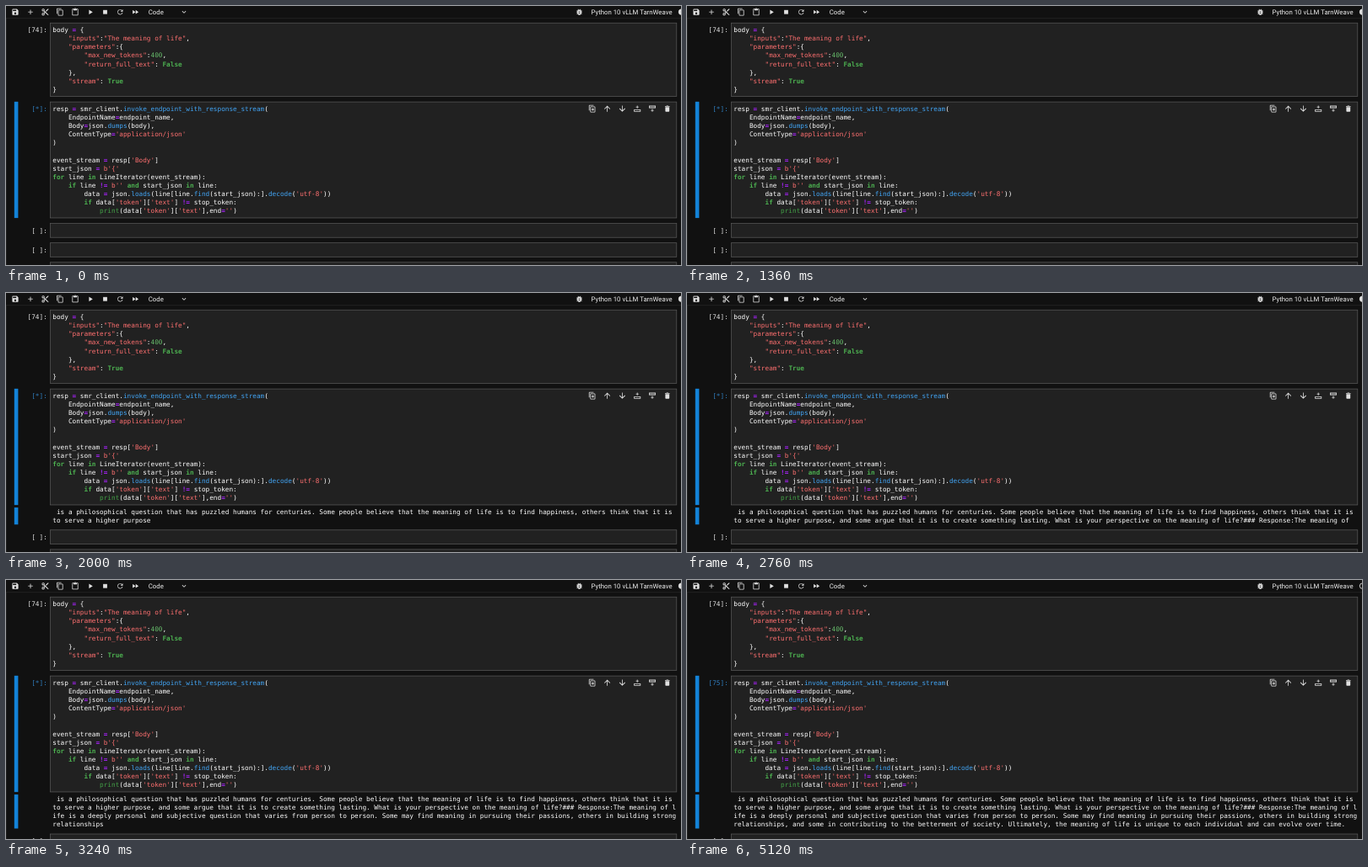
Recreate the animation shown at these times as an HTML page. Size 800x308 px, loop 5.51 s.

```html
<!DOCTYPE html>
<html lang="en">
<head>
<meta charset="utf-8">
<title>Notebook streaming response</title>
<style>
  html, body { margin: 0; width: 100%; height: 100%; overflow: hidden; background: #111; }
  svg { display: block; width: 800px; height: 308px; }
  text { white-space: pre; text-rendering: geometricPrecision; fill: #fff; }
  .mono { font: 7.727px "DejaVu Sans Mono", monospace; }
  .ui { font: 7.8px Roboto, sans-serif; fill: #eee; }
  .prompt { text-anchor: end; fill: #e0e0e0; }
  .active { fill: #307fc1; }
  .bar { fill: #1383d8; }
  .box { fill: #212121; stroke: #5c5c5c; stroke-width: .7; }
  .icon { fill: #e0e0e0; fill-rule: evenodd; }
  .str { fill: #ff7070; }
  .key { fill: #4caf50; font-weight: bold; }
  .num { fill: #66bb6a; }
  .fn { fill: #43a047; }
  .op { fill: #aa22ff; font-weight: bold; }
  .prop { fill: #42a5f5; }
</style>
</head>
<body>
<svg id="stage" viewBox="0 0 800 308">
  <rect width="800" height="308" fill="#111"/>
  <path d="M0 14.6H800M.4 14.6V308" stroke="#292929" stroke-width=".7"/>
</svg>
<script>
const LOOP = 5510, LINE = 10.105, TEXT_X = 55.3, BASE = 7.72;
const stage = document.getElementById('stage');

function add(tag, attrs, parent = stage, text) {
  const el = document.createElementNS('http://www.w3.org/2000/svg', tag);
  for (const k in attrs) el.setAttribute(k, attrs[k]);
  if (text !== undefined) el.textContent = text;
  return parent.appendChild(el);
}

// Icons on a 24 unit grid
const ICONS = {
  save: 'M17 3H5a2 2 0 0 0-2 2v14a2 2 0 0 0 2 2h14a2 2 0 0 0 2-2V7zM12 19a3 3 0 1 1 0-6 3 3 0 0 1 0 6zM15 9H5V5h10z',
  plus: 'M19 13h-6v6h-2v-6H5v-2h6V5h2v6h6z',
  cut: 'M9.6 7.6A4 4 0 1 0 7.6 9.6L10 12l-2.4 2.4a4 4 0 1 0 2 2L12 14l7 7h3v-1zM6 8a2 2 0 1 1 0-4 2 2 0 0 1 0 4zM6 20a2 2 0 1 1 0-4 2 2 0 0 1 0 4zM19 3l-6 6 2 2 7-7V3z',
  copy: 'M16 1H4a2 2 0 0 0-2 2v14h2V3h12zM19 5H8a2 2 0 0 0-2 2v14a2 2 0 0 0 2 2h11a2 2 0 0 0 2-2V7a2 2 0 0 0-2-2zM19 21H8V7h11z',
  paste: 'M19 2h-4.2a3 3 0 0 0-5.6 0H5a2 2 0 0 0-2 2v16a2 2 0 0 0 2 2h14a2 2 0 0 0 2-2V4a2 2 0 0 0-2-2zM12 2a1 1 0 1 1 0 2 1 1 0 0 1 0-2zM19 20H5V4h2v3h10V4h2z',
  play: 'M8 5v14l11-7z',
  stop: 'M6 6h12v12H6z',
  restart: 'M17.65 6.35A8 8 0 1 0 19.73 14h-2.08A6 6 0 1 1 16.22 7.78L13 11h7V4z',
  forward: 'M4 18l8.5-6L4 6zM13 6v12l8.5-6z',
  chevron: 'M7.4 8.6L12 13.2l4.6-4.6L18 10l-6 6-6-6z',
  bug: 'M20 8h-2.8a6 6 0 0 0-1.8-2L17 4.4 15.6 3l-2.2 2.2a6 6 0 0 0-2.8 0L8.4 3 7 4.4 8.6 6a6 6 0 0 0-1.8 2H4v2h2v2H4v2h2v2H4v2h2.8a6 6 0 0 0 10.4 0H20v-2h-2v-2h2v-2h-2v-2h2zM14 16h-4v-2h4zM14 12h-4v-2h4z',
  up: 'M12 3l-9 9 1.6 1.6L11 7.2V21h2V7.2l6.4 6.4L21 12z',
  down: 'M12 21l9-9-1.6-1.6L13 16.8V3h-2v13.8l-6.4-6.4L3 12z',
  above: 'M2 14h20v7H2zM4 16v3h16v-3zM11 3h2v3h3v2h-3v3h-2V8H8V6h3z',
  below: 'M2 3h20v7H2zM4 5v3h16V5zM11 13h2v3h3v2h-3v3h-2v-3H8v-2h3z',
  trash: 'M6 19a2 2 0 0 0 2 2h8a2 2 0 0 0 2-2V7H6zM19 4h-3.5l-1-1h-5l-1 1H5v2h14z'
};
ICONS.duplicate = ICONS.copy + 'M12.5 10h2v3h3v2h-3v3h-2v-3h-3v-2h3z';

const icon = (name, x, y) => add('path', {
  class: 'icon', d: ICONS[name], transform: `translate(${x} ${y}) scale(.4) translate(-12 -12)`
});

const TOKENS = /(b?'[^']*'|"[^"]*")|\b(for|in|if|and|True|False)\b|\b(\d+)\b|\b(print)\b|(!=|=)|(?<=\.)(\w+)/g;
const KINDS = ['str', 'key', 'num', 'fn', 'op', 'prop'];

function codeLine(src, y) {
  const el = add('text', { class: 'mono', x: TEXT_X, y });
  let pos = 0;
  for (const m of src.matchAll(TOKENS)) {
    el.append(src.slice(pos, m.index));
    const kind = KINDS[m.slice(1).findIndex(g => g !== undefined)];
    add('tspan', { class: kind }, el, m[0]);
    pos = m.index + m[0].length;
  }
  el.append(src.slice(pos));
}

function cell(y, label, lines, parent = stage) {
  add('rect', { class: 'box', x: 52.6, y: y + .3, width: 742.2, height: lines * LINE + 6.5 }, parent);
  return add('text', { class: 'mono prompt', x: 48.8, y: y + 3.55 + BASE }, parent, label);
}

function codeCell(y, label, src) {
  const lines = src.split('\n');
  const prompt = cell(y, label, lines.length);
  lines.forEach((s, i) => codeLine(s, y + 3.55 + BASE + i * LINE));
  return prompt;
}

// Toolbar
[['save', 11], ['plus', 29], ['cut', 46.5], ['copy', 64], ['paste', 82], ['play', 100],
 ['stop', 117.5], ['restart', 135.3], ['forward', 153.3], ['chevron', 211], ['bug', 679.5]]
  .forEach(([name, x]) => icon(name, x, 7.2));
add('text', { class: 'ui', x: 168.8, y: 9.9, 'font-weight': 500 }, stage, 'Code');
add('text', { class: 'ui', x: 693.5, y: 9.9 }, stage, 'Python 10 vLLM TarnWeave');
const status = add('circle', { cx: 800.6, cy: 7.1, r: 3.3, stroke: '#e0e0e0', 'stroke-width': .9 });

// Cells
codeCell(19.9, '[74]:', `body = {
    "inputs":"The meaning of life",
    "parameters":{
        "max_new_tokens":400,
        "return_full_text": False
    },
    "stream": True
}`);

add('rect', { class: 'bar', x: 9.8, y: 113.8, width: 4.6, height: 138.3 });
const prompt = codeCell(113.8, '[*]:', `resp = smr_client.invoke_endpoint_with_response_stream(
    EndpointName=endpoint_name,
    Body=json.dumps(body),
    ContentType='application/json'
)

event_stream = resp['Body']
start_json = b'{'
for line in LineIterator(event_stream):
    if line != b'' and start_json in line:
        data = json.loads(line[line.find(start_json):].decode('utf-8'))
        if data['token']['text'] != stop_token:
            print(data['token']['text'],end='')`);
prompt.classList.add('active');
['duplicate', 'up', 'down', 'above', 'below', 'trash']
  .forEach((name, i) => icon(name, 694.8 + i * 17.8, 122.2));

const rest = add('g', {});
for (let i = 0; i < 3; i++) cell(258.3 + i * 23.1, '[ ]:', 1, rest);

// Streamed output
const OUT_Y = 255.1;
const OUTPUT = [
  ' is a philosophical question that has puzzled humans for centuries. Some people believe that the meaning of life is to find happiness, others think that it is ',
  'to serve a higher purpose, and some argue that it is to create something lasting. What is your perspective on the meaning of life?### Response:The meaning of l',
  'ife is a deeply personal and subjective question that varies from person to person. Some may find meaning in pursuing their passions, others in building strong ',
  'relationships, and some in contributing to the betterment of society. Ultimately, the meaning of life is unique to each individual and can evolve over time.'
];
const outBar = add('rect', { class: 'bar', x: 9.8, y: OUT_Y, width: 4.6, height: 0 });
const outLines = OUTPUT.map((_, i) =>
  add('text', { class: 'mono', x: TEXT_X, y: OUT_Y + BASE + i * LINE }));

// Time in ms, characters printed so far
const STEPS = [
  [1520, 33], [1640, 72], [1760, 112], [1880, 147], [2000, 184], [2120, 211], [2240, 245],
  [2360, 288], [2520, 292], [2640, 302], [2760, 316], [2880, 357], [3000, 401], [3120, 441],
  [3240, 491], [3360, 535], [3520, 571], [3640, 608], [3760, 634]
];
const DONE = STEPS[STEPS.length - 1][0];
let shown = -1;

function render(t) {
  let count = 0;
  for (const [at, n] of STEPS) if (t >= at) count = n;
  if (count === shown) return;
  shown = count;

  let left = count, rows = 0;
  OUTPUT.forEach((s, i) => {
    outLines[i].textContent = s.slice(0, Math.max(0, left));
    if (left > 0) rows++;
    left -= s.length;
  });
  const height = rows ? Math.max(11.5, rows * LINE) : 0;
  outBar.setAttribute('height', height);
  rest.setAttribute('transform', `translate(0 ${rows ? height + 3 : 0})`);

  const done = t >= DONE;
  prompt.textContent = done ? '[75]:' : '[*]:';
  status.setAttribute('fill', done ? 'none' : '#e0e0e0');
}

const start = performance.now();
function tick() {
  render((performance.now() - start) % LOOP);
  requestAnimationFrame(tick);
}
tick();
</script>
</body>
</html>
```
